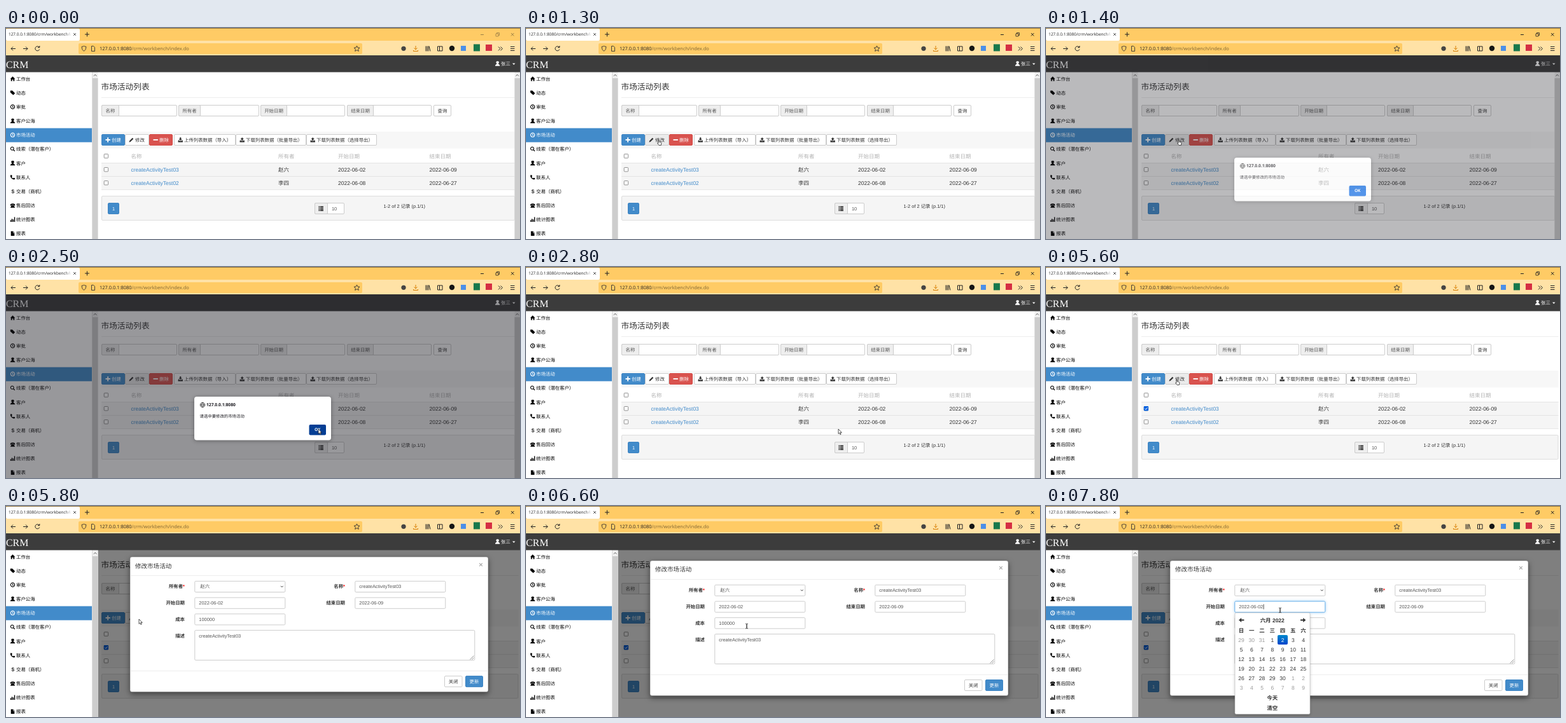
Animation of 808x332 px, one loop 8000 ms. Source, as an HTML page:

```html
<!DOCTYPE html>
<html lang="zh-CN">
<head>
<meta charset="utf-8">
<title>CRM</title>
<style>
html, body { margin: 0; width: 100%; height: 100%; overflow: hidden; background: #fff; }
svg { display: block; text-rendering: geometricPrecision; cursor: default; }
text { font-family: "Liberation Sans", "Noto Sans CJK SC", "Noto Sans CJK", sans-serif; white-space: pre; }
.ui { font-family: "Open Sans", "Noto Sans CJK SC", sans-serif; }
.serif { font-family: "Liberation Serif", serif; }
.bold { font-weight: bold; }
#modalBox { filter: drop-shadow(0 3px 4px rgba(0,0,0,.5)); }
#alertBox { filter: drop-shadow(0 1px 3px rgba(0,0,0,.35)); }
#calendarBox { filter: drop-shadow(0 2px 2px rgba(0,0,0,.2)); }
</style>
</head>
<body>
<svg id="stage" width="808" height="332" viewBox="0 0 808 332"></svg>
<script>
const BLUE = '#428bca', BODY = 7.42, LARGE = 8.48;
const ICONS = {
  home: 'M0 4.2 4 .4 8 4.2H7V8H4.9V5.4H3.1V8H1V4.2z',
  tag: 'M0 .5H3.5L8 5 5 8 0 3.5z',
  clock: 'M4 0a4 4 0 1 0 .01 0zM4 1.2a2.8 2.8 0 1 1-.01 0zM3.5 2h1v2.2H6v.9H3.5z',
  user: 'M4 0a2 2 0 0 1 1.2 3.8C5 5.2 8 5.5 8 8H0C0 5.5 3 5.2 2.8 3.8A2 2 0 0 1 4 0z',
  search: 'M3.2 0a3.2 3.2 0 1 0 .01 0zM3.2 1.2a2 2 0 1 1-.01 0zM4.9 5.9l1-1L8 7 7 8z',
  call: 'M1 0 3 1v2l-.8.6Q3 5.3 4.6 6l.9-1 2 .4.5 1.8Q7 8 6 8 1 6.5 0 2 0 1 1 0z',
  desk: 'M0 3.5Q0 1 4 1t4 2.5v1H6V3H2v1.5H0zM2.5 3.8h3L8 8H0z',
  bars: 'M0 5h1.5v3H0zM2.1 3h1.5v5H2.1zM4.3 4h1.5v4H4.3zM6.5 0H8v8H6.5z',
  file: 'M1 0h3.4v3H7v5H1zM5 0l2 2.3H5z',
  plus: 'M3 0h2v3h3v2H5v3H3V5H0V3h3z',
  minus: 'M0 3h8v2H0z',
  pencil: 'M0 8 .7 5.6 5.7.6 7.4 2.3 2.4 7.3z',
  load: 'M2.8 0h2.4v2.6H7L4 5.2 1 2.6h1.8zM1 4l1 1.5h4L7 4l1 2v2H0V6z',
  save: 'M2.8 5V2.6H1L4 0l3 2.6H5.2V5zM1 4l1 1.5h4L7 4l1 2v2H0V6z',
  list: 'M0 0h2v1.6H0zM2.7 0H8v1.6H2.7zM0 2.2h2v1.6H0zM2.7 2.2H8v1.6H2.7zM0 4.4h2V6H0zM2.7 4.4H8V6H2.7zM0 6.6h2v1.4H0zM2.7 6.6H8v1.4H2.7z',
  left: 'M0 4 4 .6v2.5h4v1.8H4v2.5z',
  right: 'M8 4 4 .6v2.5H0v1.8h4v2.5z'
};

const rect = (x, y, w, h, fill, extra = '') =>
  `<rect x="${x}" y="${y}" width="${w}" height="${h}" fill="${fill}" ${extra}/>`;
const box = (x, y, w, h, fill = '#fff', stroke = '#ccc', extra = '') =>
  rect(x + .5, y + .5, w - 1, h - 1, fill, `stroke="${stroke}" rx="1.500" ${extra}`);
// Text is placed by its vertical centre.
const text = (x, cy, str, { size = BODY, fill = '#333', cls = '', anchor = 'start' } = {}) =>
  `<text x="${x}" y="${cy + size * .36}" font-size="${size}" fill="${fill}" class="${cls}" text-anchor="${anchor}">${str}</text>`;
const icon = (name, x, cy, fill = '#000', size = 7.4) =>
  `<path transform="translate(${x} ${cy - size / 2}) scale(${size / 8})" d="${ICONS[name]}" fill="${fill}" fill-rule="evenodd"/>`;
const line = (d, stroke = '#222', width = 1, extra = '') =>
  `<path d="${d}" fill="none" stroke="${stroke}" stroke-width="${width}" ${extra}/>`;
const group = (id, ...parts) => `<g id="${id}">${parts.join('')}</g>`;

function browserBar() {
  return rect(0, 0, 808, 20, '#ffcb65') + rect(0, 0, 808, 1, '#8f713a') + rect(0, 20, 808, 23, '#ffe2a6') +
    rect(0, 1, 116, 19, '#fff', 'rx="2"') +
    text(4, 10, '127.0.0.1:8080/crm/workbench/i', { size: 6.45, fill: '#222', cls: 'ui' }) +
    rect(92, 3, 12, 14, 'url(#tabFade)') +
    line('M106 8l4 4m0-4l-4 4', '#333', .8) + line('M124 10h7M127.500 6.500v7') +
    group('controls', line('M746 10.500h5M794 8l4.500 4.500m0-4.500l-4.500 4.500'),
      line('M770 9h4v4h-4zM771.500 9V7.500h4v4H774', '#222', .8)) +
    line('M15 32.500H8m3-3-3 3 3 3M27 32.500h7m-3-3 3 3-3 3') +
    line('M52 30a3.500 3.500 0 1 0 .7 3.500M52.800 28v2.700H50') +
    rect(114, 24, 446, 17, '#ffcb65', 'rx="2"') +
    line('M122.500 28.500l3.500 1q0 5-3.500 7-3.500-2-3.500-7z', '#333', .9) +
    line('M134.500 28.500h3l2 2v6h-5z', '#333', .9) +
    text(147, 32.5, '127.0.0.1:8080<tspan fill="#7c6535">/crm/workbench/index.do</tspan>', { size: 7.44, fill: '#222', cls: 'ui' }) +
    line('M551.500 28l1.300 2.900 3.200.3-2.400 2.100.7 3.200-2.800-1.700-2.800 1.700.7-3.200-2.400-2.100 3.200-.3z', '#333', .9) +
    '<circle cx="625" cy="32.300" r="3.600" fill="#444"/>' +
    line('M644 28v6m-2.500-2.500L644 34l2.500-2.500M640.500 35v1.500h7V35', '#d77c00') +
    line('M660 28.500v8m2-8v8m2-8v8m1-8 2 8') +
    line('M678.500 29h7.500v7h-7.500zM681.500 29v7') +
    '<circle cx="701" cy="32" r="4.200" fill="#151515"/>' +
    rect(715, 28, 8, 8, '#4b8fe8') + rect(735, 25.500, 10, 11, '#18794c') + rect(754, 26, 10, 10, '#d52f43') +
    line('M774 29.500l3 3-3 3m3.500-6 3 3-3 3') + line('M793 29.500h6.500m-6.500 3h6.500m-6.500 3h6.500');
}

function header() {
  return rect(0, 43, 808, 26.5, '#3c3c3c') +
    text(0, 57.3, 'CRM', { size: 15.9, fill: '#fff', cls: 'serif' }) +
    icon('user', 769, 56, '#fff') + text(778, 56.5, '张三', { fill: '#fff' }) +
    '<path d="M796 55.500h4.500l-2.250 2.500z" fill="#fff"/>';
}

function scrollbar(x) {
  return rect(x, 69, 8.5, 263, '#f0f0f0') + rect(x, 79, 8.5, 253, '#cdcdcd') +
    line(`M${x + 2} 75.500l2.200-2.200 2.200 2.200`, '#555');
}

function sidebar() {
  const items = [['home', '工作台'], ['tag', '动态'], ['clock', '审批'], ['user', '客户公海'], ['clock', '市场活动'],
    ['search', '线索（潜在客户）'], ['user', '客户'], ['call', '联系人'], ['', '交易（商机）'], ['desk', '售后回访'],
    ['bars', '统计图表'], ['file', '报表']];
  return rect(0, 69, 136, 263, '#fff') + rect(0, 157.6, 135, 22.1, BLUE) +
    items.map(([name, label], i) => {
      const y = 80 + i * 22.15, fill = i === 4 ? '#fff' : '#000';
      const mark = name ? icon(name, 6.8, y - .3, fill) : text(8.5, y, '$', { size: 8.5, cls: 'bold' });
      return mark + text(16, y, label, { fill });
    }).join('') + rect(135, 69, 1, 263, '#ddd') + scrollbar(136);
}

function field(label, x, split, right) {
  return box(x, 121, right - x, 18) + box(x, 121, split - x, 18, '#eee') +
    text((x + split) / 2, 130, label, { fill: '#555', anchor: 'middle' });
}

function button(x, right, y, label, name, { fill = '#fff', stroke = '#ccc', color = '#333', extra = '' } = {}) {
  return box(x, y, right - x, 18, fill, stroke, extra) + (name ? icon(name, x + 6.5, y + 9, color) : '') +
    text(name ? x + 16 : (x + right) / 2, y + 9, label, { fill: color, anchor: name ? 'start' : 'middle' });
}

const primary = { fill: BLUE, stroke: '#3d84c3', color: '#fff' };
const danger = { fill: '#d9534f', stroke: '#d64b46', color: '#fff' };
const checkbox = y => rect(154.2, y - 3.2, 6.4, 6.4, '#fff', 'stroke="#777" stroke-width=".8" rx="1"');

function tableRow(id, y, name, owner, start, end) {
  const cell = (x, str, fill = '#333') => text(x, y, str, { size: LARGE, fill });
  return rect(150, y - 10.5, 650, 21, '#f5f5f5', `id="${id}" class="wide"`) +
    rect(150, y - 10.5, 650, .7, '#ddd', 'class="wide"') + checkbox(y) +
    cell(196.5, name, BLUE) + cell(428, owner) + cell(522, start) + cell(665.5, end);
}

function page() {
  const heads = [[196.5, '名称'], [428, '所有者'], [522, '开始日期'], [665.5, '结束日期']];
  return rect(144.5, 69, 664, 263, '#fff') + text(149.5, 92.5, '市场活动列表', { size: 12.7 }) +
    rect(150, 109, 650, .7, '#e6e6e6', 'class="wide"') +
    field('名称', 150, 178, 269) + field('所有者', 271, 306, 398) +
    field('开始日期', 400, 442, 533) + field('结束日期', 536, 578, 669) + button(672, 700, 121, '查询') +
    rect(150, 163, 650, 26.5, '#f7f7f7', 'class="wide"') +
    button(187, 225, 167, '修改', 'pencil', { extra: 'id="edit"' }) +
    button(150, 187, 167, '创建', 'plus', primary) + button(225, 262, 167, '删除', 'minus', danger) +
    button(264, 361, 167, '上传列表数据（导入）', 'load') + button(361, 472, 167, '下载列表数据（批量导出）', 'save') +
    button(472, 583, 167, '下载列表数据（选择导出）', 'save') +
    rect(150, 190, 650, 22, '#fff', 'class="wide"') + checkbox(201.5) +
    heads.map(([x, s]) => text(x, 202, s, { size: LARGE, fill: '#b3b3b3' })).join('') +
    tableRow('row0', 222.7, 'createActivityTest03', '赵六', '2022-06-02', '2022-06-09') +
    tableRow('row1', 243.7, 'createActivityTest02', '李四', '2022-06-08', '2022-06-27') +
    rect(150, 254, 650, .7, '#ddd', 'class="wide"') +
    group('checked', rect(153.8, 219, 7.2, 7.2, '#0060df', 'rx="1"'), line('M155.300 222.700l1.600 1.600 2.700-3.300', '#fff')) +
    box(150, 264, 650, 39, '#f5f5f5', '#ddd', 'class="wide"') +
    button(160, 178, 275, '1', '', primary) + box(485, 275, 47, 18) + box(485, 275, 21, 18, '#eee') +
    icon('list', 491.5, 284.3, '#222') + text(512, 284, '10', { fill: '#555' }) +
    text(593.5, 280.5, '1-2 of 2 记录 (p.1/1)') + group('scroll', scrollbar(799.5));
}

function alertDialog() {
  return group('alert', rect(0, 43, 808, 289, 'rgba(28,27,34,.45)'),
    rect(296, 204, 215, 68.5, '#fff', 'rx="4" id="alertBox"'),
    line('M309 213.300a3.700 3.700 0 1 0 .01 0zM309 213.300q-3.200 3.700 0 7.400 3.200-3.700 0-7.400M305.300 217h7.400', '#222', .8),
    text(315, 217, '127.0.0.1:8080', { size: 6.7, fill: '#15141a', cls: 'ui bold' }),
    text(304.5, 235, '请选中要修改的市场活动', { size: 6.4, fill: '#15141a' }),
    rect(476.5, 248, 26.5, 16.5, '#0061e0', 'rx="2" id="ok"'),
    text(489.7, 256, 'OK', { size: 6.6, fill: '#fff', cls: 'ui bold', anchor: 'middle' }));
}

function modal() {
  const label = (right, y, str, required) =>
    text(right, y, str + (required ? '<tspan fill="red">*</tspan>' : ''), { cls: 'bold', anchor: 'end' });
  const input = (x, y, value, extra) => box(x, y - 9, 143, 18.2, '#fff', '#ccc', extra) + text(x + 7, y, value, { fill: '#555' });
  return group('modal', rect(195, 86, 563, 212.5, '#fff', 'rx="3" stroke="#777" stroke-width=".5" id="modalBox"'),
    text(203, 100, '修改市场活动', { size: 9.54 }), text(746.5, 97.5, '×', { size: 11, fill: '#aaa', cls: 'bold', anchor: 'middle' }),
    rect(195, 115, 563, .7, '#e5e5e5'), rect(195, 265, 563, .7, '#e5e5e5'),
    label(281, 132.7, '所有者', true), input(296.3, 132.7, ' 赵六'), line('M432 131.700l1.800 1.800 1.800-1.800', '#333'),
    label(533, 132.7, '名称', true), input(548.3, 132.7, 'createActivityTest03'),
    label(281, 158.5, '开始日期'), input(296.3, 158.5, '2022-06-02', 'id="startDate"'),
    label(533, 158.5, '结束日期'), input(548.3, 158.5, '2022-06-09'),
    label(281, 184.2, '成本'), input(296.3, 184.2, '100000'),
    label(281, 210, '描述'), box(296.3, 201, 441, 48), text(303.3, 210, 'createActivityTest03', { fill: '#555' }),
    line('M729.500 247.500l6-6m-3 6 3-3', '#777', .8),
    button(689, 717.5, 273, '关闭'), button(722, 750, 273, '更新', '', primary));
}

function calendar() {
  const mid = (x, y, str, fill = '#333', cls = '') => text(x, y, str, { size: LARGE, fill, cls, anchor: 'middle' });
  const colX = c => 307 + c * 16.25;
  let out = rect(297, 168, 118, 159.5, '#fff', 'rx="2" stroke="#bbb" stroke-width=".6" id="calendarBox"') +
    icon('left', 303, 179.5, '#333', 8.4) + icon('right', 400, 179.5, '#333', 8.4) + mid(355.7, 179.5, '六月 2022', '#333', 'bold');
  [...'日一二三四五六'].forEach((day, c) => out += mid(colX(c), 195.5, day, '#333', 'bold'));
  for (let i = 0; i < 42; i++) {
    const date = new Date(2022, 4, 29 + i), x = colX(i % 7), y = 210.5 + Math.floor(i / 7) * 15;
    const inMonth = date.getMonth() === 5, selected = inMonth && date.getDate() === 2;
    if (selected) out += rect(x - 8, y - 7.5, 16, 15, 'url(#dayFill)', 'rx="2"');
    out += mid(x, y, date.getDate(), selected ? '#fff' : inMonth ? '#333' : '#999');
  }
  return group('calendar', rect(341.7, 154.5, .8, 8, '#222'), out,
    mid(355.7, 301.5, '今天', '#333', 'bold'), mid(355.7, 317.5, '清空', '#333', 'bold'));
}

const pointers =
  '<path id="arrow" d="M0 0v7.500l1.700-1.600 1.200 2.700 1.300-.6-1.200-2.600h2.300z" fill="#fff" stroke="#111" stroke-width=".7"/>' +
  '<path id="hand" d="M0 .5q.8-.7 1.400 0v2.700l2.900.8q.7.300.6 1L4.300 8.500H1L-1.500 5.300q.4-1 1.500.1z" fill="#fff" stroke="#111" stroke-width=".7"/>' +
  line('M-2-3.800q2 0 2 1v5.600q0 1-2 1M2-3.800q-2 0-2 1v5.600q0 1 2 1', '#222', .8, 'id="beam"');

document.getElementById('stage').innerHTML =
  `<defs><linearGradient id="tabFade"><stop stop-color="#fff" stop-opacity="0"/><stop offset="1" stop-color="#fff"/></linearGradient>
   <linearGradient id="dayFill" x2="0" y2="1"><stop stop-color="#08c"/><stop offset="1" stop-color="#04c"/></linearGradient></defs>` +
  page() + rect(144.5, 69, 664, 263, '#000', 'id="backdrop"') + modal() + calendar() +
  sidebar() + header() + browserBar() + alertDialog() + group('cursor', pointers);

const el = id => document.getElementById(id);
const wide = [...document.querySelectorAll('.wide')].map(node => [node, +node.getAttribute('width')]);
const show = (id, on) => el(id).style.display = on ? '' : 'none';
const clamp = v => Math.max(0, Math.min(1, v));

// Pointer path: time, x, y
const PATH = [[0, 330, 296], [100, 330, 296], [800, 208, 176], [1600, 208, 176], [1800, 481, 246], [2000, 481, 246],
  [2300, 491, 255], [2900, 491, 255], [3200, 330, 249], [3300, 330, 249], [3700, 155, 222], [4300, 155, 222],
  [4900, 205, 177], [5700, 205, 177], [5800, 209, 178], [6200, 322, 196], [6600, 347, 189], [7000, 347, 189],
  [7400, 368, 164], [8000, 368, 164]];

function pointerAt(t) {
  const i = PATH.findIndex(p => p[0] > t), [t0, x0, y0] = PATH[i - 1], [t1, x1, y1] = PATH[i];
  const p = (t - t0) / (t1 - t0), k = p * p * (3 - 2 * p);
  return [x0 + (x1 - x0) * k, y0 + (y1 - y0) * k];
}

function draw(t) {
  const [x, y] = pointerAt(t);
  const alerting = t >= 1400 && t < 2700, opening = t >= 5600, free = !alerting && !opening;
  const onEdit = x > 187 && x < 225 && y > 167 && y < 185 && t < 5700;
  const onOk = alerting && x > 476 && x < 503 && y > 248;
  const beam = t >= 6100;

  // The window is inactive until the first click.
  el('controls').style.opacity = t < 1100 ? .45 : 1;
  el('edit').setAttribute('fill', onEdit || alerting ? '#ebebeb' : '#fff');
  [212.2, 233.2].forEach((top, i) => {
    const hover = free && t >= 100 && x > 150 && x < 800 && y >= top && y < top + 21;
    el('row' + i).setAttribute('fill', hover ? '#e5e5e5' : '#f5f5f5');
  });
  show('checked', t >= 4000);

  show('alert', alerting);
  el('alert').style.opacity = clamp((t - 1300) / 150);
  el('ok').setAttribute('fill', t >= 2500 ? '#053e94' : onOk ? '#0250bb' : '#0061e0');

  show('scroll', !opening);
  wide.forEach(([node, width]) => node.setAttribute('width', width + (opening ? 5.5 : 0)));
  const fade = clamp((t - 5600) / 150), rest = 1 - clamp((t - 5600) / 300);
  el('backdrop').style.opacity = fade / 2;
  show('modal', fade > 0);
  el('modal').style.opacity = fade;
  el('modal').setAttribute('transform', `translate(0 ${-53 * rest * rest})`);

  const focused = t >= 7600;
  show('calendar', focused);
  el('startDate').setAttribute('stroke', focused ? '#66afe9' : '#ccc');
  el('startDate').style.filter = focused ? 'drop-shadow(0 0 2px rgba(102,175,233,.6))' : '';

  show('cursor', t >= 100);
  el('cursor').setAttribute('transform', `translate(${x} ${y})`);
  show('beam', beam);
  show('hand', !beam && onEdit);
  show('arrow', !beam && !onEdit);
}

const begin = performance.now();
function tick() {
  draw(Math.floor((performance.now() - begin) % 8000 / 100) * 100);
  requestAnimationFrame(tick);
}
tick();
</script>
</body>
</html>
```
